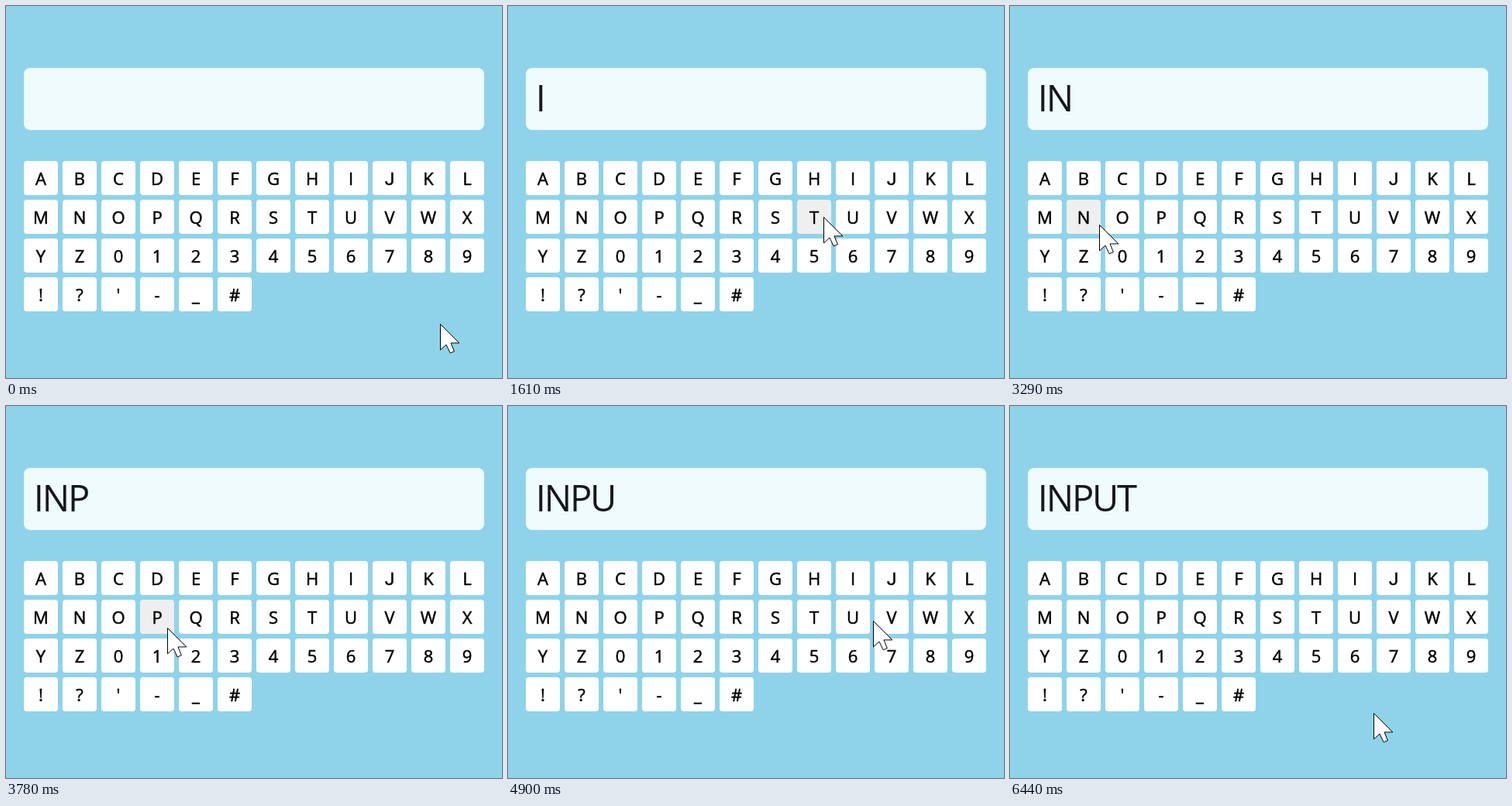
Animation of 640 by 480 pixels, one loop 7.21 s. Source, as an HTML page:

```html
<!DOCTYPE html>
<html lang="en">
<head>
<meta charset="utf-8">
<title>On-screen keyboard</title>
<style>
  html, body { margin: 0; width: 100%; height: 100%; overflow: hidden; background: #8fd3ea; }
  svg { display: block; width: 640px; height: 480px; }
  text { font-family: "Open Sans", "Noto Sans", sans-serif; }
  .field { fill: #effbfd; }
  .typed { font-size: 47px; letter-spacing: -2.2px; fill: #15181a; }
  .key rect { fill: #fff; }
  .key.hover rect { fill: #efefef; }
  .key text { font-size: 22px; text-anchor: middle; stroke: #000; stroke-width: .5px; }
  .key.hook text { font-family: Roboto, Lato, sans-serif; }
  .cursor { fill: #fff; stroke: #000; }
</style>
</head>
<body>
<svg viewBox="0 0 640 480">
  <rect width="640" height="480" fill="#8fd3ea"/>
  <rect class="field" x="23" y="80" width="594" height="80" rx="8"/>
  <text class="typed" id="typed" x="35.8" y="136.3"></text>
  <g id="keys"></g>
  <path class="cursor" id="cursor" d="M.5 .5V33.8L8 27L13.2 37.8L18.4 35.6L14 24.9H24.9Z"/>
</svg>
<script>
const LOOP = 7210, STEP = 70;
const LABELS = "ABCDEFGHIJKLMNOPQRSTUVWXYZ0123456789!?'-_#";

// Key points of the pointer; a key is typed one step after reaching it
const STOPS = [
  { at: 0, x: 560, y: 410, hold: 70 },
  { at: 770, x: 461, y: 213 },
  { at: 980, x: 461, y: 212, press: "I" },
  { at: 1610, x: 407, y: 272 },
  { at: 2240, x: 227, y: 293 },
  { at: 2380, x: 137, y: 287 },
  { at: 2730, x: 115, y: 282, hold: 560, press: "N" },
  { at: 3570, x: 200, y: 286, hold: 140, press: "P" },
  { at: 4270, x: 417, y: 296 },
  { at: 4690, x: 449, y: 274, hold: 140, press: "U" },
  { at: 5110, x: 588, y: 294 },
  { at: 5460, x: 384, y: 275, hold: 420, press: "T" },
  { at: 6440, x: 469, y: 396, hold: LOOP - 6440 }
];
const path = STOPS.flatMap(s => s.hold ? [s, { ...s, at: s.at + s.hold }] : [s]);
const presses = STOPS.filter(s => s.press);

const SVG = "http://www.w3.org/2000/svg";
const typed = document.getElementById("typed");
const cursor = document.getElementById("cursor");

function add(parent, tag, attrs) {
  const el = document.createElementNS(SVG, tag);
  for (const name in attrs) el.setAttribute(name, attrs[name]);
  return parent.appendChild(el);
}

const keys = [...LABELS].map((label, i) => {
  const x = 23 + i % 12 * 50, y = 200 + Math.floor(i / 12) * 50;
  const el = add(document.getElementById("keys"), "g", { class: "key" });
  el.classList.toggle("hook", label === "J");
  add(el, "rect", { x, y, width: 44, height: 44, rx: 4 });
  add(el, "text", { x: x + 22, y: y + 30.5 }).textContent = label;
  return { el, x, y };
});

function slope(i, axis) {
  const a = path[i], b = path[i + 1];
  return (b[axis] - a[axis]) / (b.at - a.at);
}

// Zero at rests and turning points, so the curve never overshoots
function tangent(i, axis) {
  if (i === 0 || i === path.length - 1) return 0;
  const a = slope(i - 1, axis), b = slope(i, axis);
  return a * b > 0 ? 2 * a * b / (a + b) : 0;
}

function pointer(t, axis) {
  let i = 0;
  while (i < path.length - 2 && path[i + 1].at <= t) i++;
  const a = path[i], b = path[i + 1];
  const span = b.at - a.at, u = (t - a.at) / span, v = 1 - u;
  return a[axis] * v * v * (1 + 2 * u) + b[axis] * u * u * (3 - 2 * u)
    + span * u * v * (tangent(i, axis) * v - tangent(i + 1, axis) * u);
}

function draw() {
  const t = Math.floor(performance.now() % LOOP / STEP) * STEP;
  const x = Math.round(pointer(t, "x")), y = Math.round(pointer(t, "y"));
  cursor.setAttribute("transform", `translate(${x} ${y})`);
  for (const key of keys) {
    const over = x >= key.x && x < key.x + 44 && y >= key.y && y < key.y + 44;
    key.el.classList.toggle("hover", over);
  }
  typed.textContent = presses.filter(s => s.at + STEP <= t).map(s => s.press).join("");
  requestAnimationFrame(draw);
}
draw();
</script>
</body>
</html>
```
